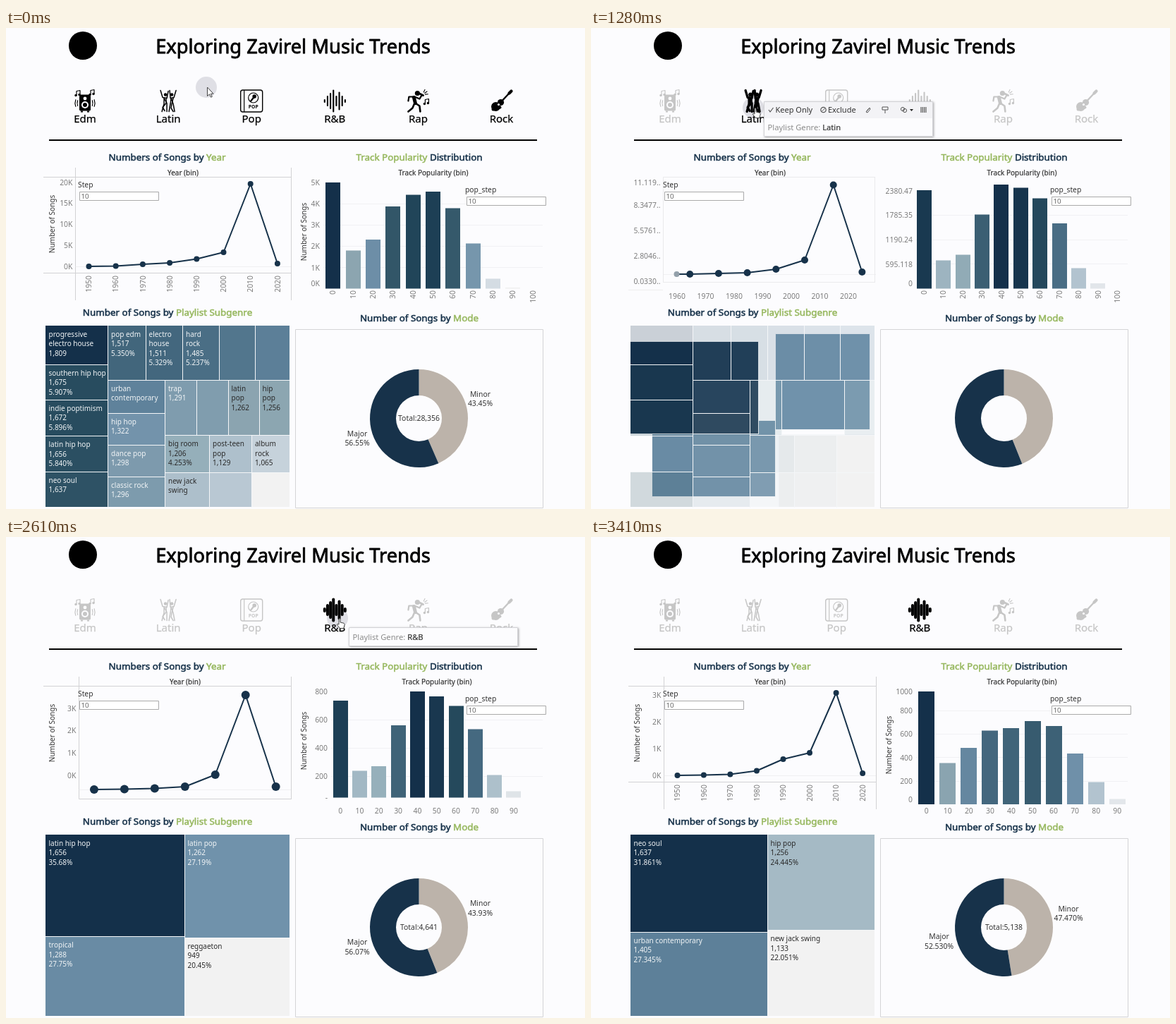
Recreate the animation shown at these times as an HTML page with a canvas. Size 821 px wide and 682 px high, loop 3.46 s.

```html
<!DOCTYPE html>
<html lang="en">
<head>
<meta charset="utf-8">
<title>Music Trends Dashboard</title>
<style>
  html, body { margin: 0; width: 100%; height: 100%; overflow: hidden; background: #fcfcfe; }
  canvas { display: block; }
</style>
</head>
<body>
<canvas id="stage" width="821" height="682"></canvas>
<script>
const ctx = document.getElementById('stage').getContext('2d');
const LOOP = 3460;
const BG = '#fcfcfe', NAVY = '#17324a', GREEN = '#97b85f', INK = '#333', GREY = '#7c7c7c', RULE = '#d2d2d4';
const TAU = Math.PI * 2;

// ---------- helpers ----------
const mix = (a, b, p) => Array.isArray(a) ? a.map((v, i) => mix(v, b[i], p)) : a + (b - a) * p;
const hold = (keys, t) => keys.filter(k => k[0] <= t).pop();
const clamp = (v, lo, hi) => Math.min(hi, Math.max(lo, v));
const crisp = v => Math.floor(v) + 0.5;
const font = (size, weight = 400) => `${weight} ${size}px "Noto Sans", "Open Sans", sans-serif`;

// heavy: outline width that thickens regular text to a medium weight
function text(s, x, y, { size = 10, color = INK, align = 'left', weight = 400, heavy = 0, rot = 0 } = {}) {
  ctx.save();
  ctx.translate(x, y);
  ctx.rotate(rot);
  ctx.font = font(size, weight);
  ctx.textAlign = align;
  ctx.fillStyle = ctx.strokeStyle = color;
  ctx.fillText(s, 0, size * 0.36);
  if (heavy) {
    ctx.lineWidth = heavy;
    ctx.lineJoin = 'round';
    ctx.strokeText(s, 0, size * 0.36);
  }
  const width = ctx.measureText(s).width;
  ctx.restore();
  return width;
}

function line(x1, y1, x2, y2, color = RULE, width = 1, dash = []) {
  ctx.strokeStyle = color;
  ctx.lineWidth = width;
  ctx.setLineDash(dash);
  ctx.beginPath();
  ctx.moveTo(x1, y1);
  ctx.lineTo(x2, y2);
  ctx.stroke();
  ctx.setLineDash([]);
}

function box(x, y, w, h, fill, stroke) {
  if (fill) { ctx.fillStyle = fill; ctx.fillRect(x, y, w, h); }
  if (stroke) { ctx.strokeStyle = stroke; ctx.lineWidth = 1; ctx.strokeRect(x + 0.5, y + 0.5, w - 1, h - 1); }
}

function dot(x, y, r, color) {
  if (color) ctx.fillStyle = color;
  ctx.beginPath();
  ctx.arc(x, y, r, 0, TAU);
  ctx.fill();
}

function poly(points, width) {
  ctx.lineWidth = width;
  ctx.beginPath();
  for (let i = 0; i < points.length; i += 2) ctx.lineTo(points[i], points[i + 1]);
  ctx.stroke();
}

// Shared light-to-navy scale for bars and tiles
const RAMP = [[0, 0xf2f2f2], [.1, 0xd2dae2], [.2, 0xb1c2ce], [.3, 0x95afba], [.36, 0x8ca5b0], [.44, 0x7192ab],
  [.54, 0x5d8099], [.66, 0x42667c], [.77, 0x335769], [.88, 0x22465a], [.93, 0x1b3b52], [1, 0x14304a]];
function shade(v) {
  const i = clamp(RAMP.findIndex(s => s[0] >= v), 1, RAMP.length - 1);
  const [[a, from], [b, to]] = [RAMP[i - 1], RAMP[i]];
  const p = clamp((v - a) / (b - a), 0, 1);
  const channel = n => Math.round(mix(from >> n & 255, to >> n & 255, p));
  return `rgb(${channel(16)},${channel(8)},${channel(0)})`;
}

// ---------- genre icons, centred on the origin ----------
function note(x, y) {
  dot(x, y + 4, 1.7);
  dot(x + 5, y + 3, 1.7);
  poly([x + 1, y + 4, x + 1, y - 2, x + 6, y - 3, x + 6, y + 3], 1.2);
}

const ICONS = {
  Edm() {
    ctx.beginPath();
    ctx.roundRect(-8, -9, 16, 23, 2);
    ctx.fill();
    ctx.fillRect(-6, 14, 3, 2);
    ctx.fillRect(3, 14, 3, 2);
    const color = ctx.fillStyle;
    dot(0, -3.5, 2.4, BG);
    dot(0, 5.5, 5, BG);
    dot(0, 5.5, 3, color);
    ctx.lineWidth = 1.2;
    for (const side of [0, Math.PI]) for (const r of [11, 14]) {
      ctx.beginPath();
      ctx.arc(0, 3, r, side - .35, side + .35);
      ctx.stroke();
    }
    note(-13, -12);
    note(7, -13);
  },
  Latin(bold) {
    const w = 1.5 * bold;
    dot(-4, -9, 1.8 + bold * .5);
    dot(5, -9, 1.8 + bold * .5);
    poly([-11, -15, -8, -5, -2, -4, 0, -14], w);
    poly([2, -15, 3, -4, 8, -5, 11, -15], w);
    poly([-9, 15, -6, 4, -6, -4, -2, 3, -2, 15], w);
    poly([1, 15, 3, 4, 4, -4, 7, 4, 9, 15], w);
    poly([-3, -3, -3, 3, -8, 9, -5, 14], w);
    poly([7, -4, 5, 4, 4, 10, 7, 15], w);
  },
  Pop() {
    ctx.lineWidth = 1.4;
    ctx.beginPath();
    ctx.roundRect(-15.5, -15.5, 31, 31, 3);
    ctx.stroke();
    poly([-10.5, -15, -10.5, 15], 1.2);
    ctx.beginPath();
    ctx.arc(2.5, -4.5, 7, 0, TAU);
    ctx.stroke();
    dot(4, -6.5, 2.8);
    poly([3, -5, -1, 0], 2.2);
    text('POP', 2.5, 8, { size: 6.8, weight: 700, align: 'center', color: ctx.fillStyle });
  },
  'R&B'(bold) {
    [3, 13, 21, 30, 13, 24, 13, 3].forEach((h, i) => {
      const x = -14.5 + i * 4.15;
      poly([x, -h / 2, x, h / 2], 2.1 * Math.min(bold, 1.9));
    });
  },
  Rap() {
    dot(-1, -11, 3.6);
    poly([-6, -5, -4, 3], 5);
    poly([-5, -6, 2, -3, 5, -8], 2.4);
    poly([-6, -6, -13, -6, -14, 0], 2.2);
    poly([-4, 3, 2, 7, 3, 15], 2.6);
    poly([-5, 3, -8, 10, -14, 15], 2.6);
    poly([3, -10, 7, -8], 3);
    for (const a of [-1.1, -.6, -.1]) {
      poly([6 + 4 * Math.cos(a), -9 + 4 * Math.sin(a), 6 + 8 * Math.cos(a), -9 + 8 * Math.sin(a)], 1.1);
    }
    note(9, 0);
  },
  Rock() {
    dot(-8, 8, 6.5);
    dot(-1, 2, 4.6);
    poly([-12, 12, -2, 9], 4);
    poly([-4, 5, 11, -11], 2.4);
    poly([11, -11, 14, -14], 4.2);
    poly([-10, 6, -6, 10], 1);
    dot(-4, 5, 1.6, BG);
  }
};

function drawGenres(selected, hovered) {
  Object.keys(ICONS).forEach((name, i) => {
    const x = 112 + i * 118.1;
    const active = !selected || name === selected;
    const bold = name === selected ? 2.2 : name === hovered ? 1.7 : 1;
    ctx.save();
    ctx.translate(x, 103.5);
    ctx.lineCap = ctx.lineJoin = 'round';
    ctx.fillStyle = ctx.strokeStyle = active || name === hovered ? '#000' : '#c6c6c6';
    ICONS[name](bold);
    ctx.restore();
    text(name, x, 128.5, { size: 15, align: 'center', heavy: .25, color: active ? '#000' : '#c6c6c6' });
  });
}

// ---------- static parts ----------
function heading(parts, cx, y) {
  const size = 13.4;
  ctx.font = font(size);
  let x = cx - ctx.measureText(parts.map(p => p[0]).join('')).width / 2;
  for (const [s, color] of parts) x += text(s, x, y, { size, heavy: .55, color });
}

function stepInput(label, x, y) {
  text(label, x, y, { size: 10.3 });
  box(x + 2, y + 10, 113, 13, '#fff', '#aaa');
  text('10', x + 4.5, y + 16.5, { color: '#666', size: 9.8 });
}

function drawHeader() {
  box(0, 0, 821, 682, BG);
  dot(109, 25, 20, '#000');
  text('Exploring Zavirel Music Trends', 407, 26.5, { size: 27.3, heavy: .8, align: 'center', color: '#000' });
  box(61, 158, 692, 2, '#000');
  heading([['Numbers of Songs by ', NAVY], ['Year', GREEN]], 228.5, 183);
  heading([['Track Popularity', GREEN], [' Distribution', NAVY]], 586, 183);
  heading([['Number of Songs by ', NAVY], ['Playlist Subgenre', GREEN]], 229, 403.5);
  heading([['Number of Songs by ', NAVY], ['Mode', GREEN]], 586, 411.5);
}

// ---------- line chart ----------
const YEAR_ALL = { left: 98.5, title: 251, x0: 117.5, dx: 38.2, r: 4, first: 0, base: 347.5, songsY: 278, zero: 338.5,
  ys: [338, 337.5, 335, 333, 327.5, 318, 221, 334], ticks: ['20K', '15K', '10K', '5K', '0K'], tickY: [219, 338] };
const YEAR_MID = { left: 102.5, title: 254, x0: 99.5, dx: 40.7, r: 5, first: 0, flat: true, bare: true, zero: 349.5,
  ys: [349, 349, 348, 347, 342, 329, 222.5, 346], tickY: [215, 359],
  ticks: ['11.119..', '8.3477..', '5.5761..', '2.8046..', '0.0330..'] };
const YEAR_LATIN = { left: 103.5, title: 254, x0: 82, dx: 42.95, r: 6, first: 1, base: 371.5, songsY: 290, flat: true, zero: 358.5,
  ys: [358, 358, 357.5, 356.5, 354, 337, 224, 354], ticks: ['3K', '2K', '1K', '0K'], tickY: [247, 358] };
const YEAR_RNB = { left: 103.5, title: 254, x0: 122.3, dx: 37.55, r: 4, first: 0, base: 347.5, songsY: 278, zero: 338.5,
  ys: [338, 337.5, 336.5, 331.5, 315, 306, 221, 335], ticks: ['3K', '2K', '1K', '0K'], tickY: [224, 338] };

function drawYear(c) {
  text('Year (bin)', c.title, 205, { align: 'center', heavy: .2 });
  if (c.bare) {
    ctx.setLineDash([1, 1]);
    box(102, 211, 301, 150, null, '#d8d8da');
    ctx.setLineDash([]);
    line(53, 371.5, 102, 371.5, '#eee');
  } else {
    const bottom = c.noLabels ? c.base : 386;
    line(53, 211.5, 405, 211.5);
    line(c.left, 198, c.left, bottom);
    line(404.5, 198, 404.5, bottom);
    line(c.noLabels ? c.left : 53, c.base, 405, c.base);
    text('Number of Songs', 65, c.songsY, { rot: -Math.PI / 2, align: 'center' });
  }
  line(c.left, c.zero, 404, c.zero, '#e4e4e6', 1, [1, 1]);
  c.ticks.forEach((s, i) => {
    const y = mix(...c.tickY, i / (c.ticks.length - 1));
    text(s, c.left - 4, Math.max(219, y), { size: 10.4, color: GREY, align: 'right' });
  });
  const xs = c.ys.map((_, i) => Math.max(c.left + 19, c.x0 + c.dx * i));
  ctx.strokeStyle = NAVY;
  ctx.lineJoin = 'round';
  poly(c.ys.flatMap((y, i) => i < c.first ? [] : [xs[i], y]), 2);
  c.ys.forEach((y, i) => {
    if (i < c.first) return;
    const fading = c.bare && i === 0;
    dot(xs[i], y, fading ? 4 : c.r, fading ? '#93a0aa' : NAVY);
  });
  if (!c.noLabels) xs.forEach((x, i) => {
    if (c.bare) { x = 122 + (i - 1) * 40.5; if (!i) return; }
    if (i < c.first) return;
    const style = { size: 10.4, color: GREY };
    if (c.flat) text(1950 + i * 10, x, 380, { ...style, align: 'center' });
    else text(1950 + i * 10, x, 351, { ...style, align: 'right', rot: -Math.PI / 2 });
  });
  stepInput('Step', 102, 222);
}

// ---------- bar chart ----------
const BARS_ALL = { x0: 463.7, dx: 28.33, w: 21, base: 369.5, right: 445, title: 606, songsY: 289,
  tops: [219, 315.5, 300, 253, 236.5, 232, 255.5, 305.5, 355.5, 368],
  ticks: ['5K', '4K', '3K', '2K', '1K', '0K'], tickY: [219, 30.2] };
const BARS_MID = { x0: 472.3, dx: 27.4, w: 21, base: 369.5, right: 456, title: 611,
  tops: [230, 329.5, 321.5, 264.5, 222, 226.5, 241.5, 277, 340.5, 362],
  ticks: ['2380.47', '1785.35', '1190.24', '595.118', '0'], tickY: [231, 34.6] };
const BARS_LATIN = { x0: 474.2, dx: 27.3, w: 21, base: 369.5, right: 456, title: 611, songsY: 289,
  tops: [232, 331.5, 325, 267, 219, 226, 239.5, 272.5, 337.5, 360.5],
  ticks: ['800', '600', '400', '200', '0'], tickY: [219, 37.5] };
const BARS_RNB = { x0: 475.7, dx: 30.06, w: 23, base: 379, right: 456, title: 611, songsY: 295, flat: true,
  tops: [219, 320.5, 299, 274.5, 271, 261, 268, 307, 347.5, 371.5],
  ticks: ['1000', '800', '600', '400', '200', '0'], tickY: [213, 33.3] };

function drawBars(c) {
  text('Track Popularity (bin)', c.title, 205, { align: 'center', heavy: .2 });
  if (c.songsY) text('Number of Songs', 422, c.songsY, { rot: -Math.PI / 2, align: 'center' });
  c.ticks.forEach((s, i) => {
    const y = c.tickY[0] + c.tickY[1] * i;
    if (i && i < c.ticks.length - 1) line(c.right + 5, crisp(y), 761, crisp(y), '#f1f1f4');
    text(s, c.right, clamp(y, 219, c.base - (s === '-' ? 0 : 7)), { size: 10.4, color: GREY, align: 'right' });
  });
  const peak = c.base - Math.min(...c.tops);
  c.tops.forEach((top, i) => {
    const x = Math.round(c.x0 + c.dx * i - c.w / 2);
    box(x, top, Math.round(c.w), c.base - top, shade((c.base - top) / peak));
  });
  for (let i = 0; i < (c.flat ? 10 : 11); i++) {
    const x = c.x0 + c.dx * i, style = { size: 10.4, color: GREY };
    if (c.flat) text(i * 10, x, 388, { ...style, align: 'center' });
    else text(i * 10, x, 372, { ...style, align: 'right', rot: -Math.PI / 2 });
  }
  stepInput('pop_step', 651, 229);
}

// ---------- treemap ----------
function tiles(xs, ys, cells) {
  const cols = xs.length - 1;
  return cells.map(([value, label], i) => {
    const c = i % cols, r = Math.floor(i / cols);
    return { rect: [xs[c], ys[r], xs[c + 1], ys[r + 1]], value, label };
  });
}
const TREE_ALL = [
  ...tiles([56, 144.5], [422, 477, 527, 578.5, 629, 679], [
    [1809, 'progressive|electro house|1,809'], [1675, 'southern hip hop|1,675|5.907%'],
    [1672, 'indie poptimism|1,672|5.896%'], [1656, 'latin hip hop|1,656|5.840%'], [1637, 'neo soul|1,637']]),
  ...tiles([144.5, 198, 250.5, 302.5, 353, 402], [422, 499], [
    [1517, 'pop edm|1,517|5.350%'], [1511, 'electro|house|1,511|5.329%'], [1485, 'hard|rock|1,485|5.237%'], [1455], [1416]]),
  ...tiles([144.5, 225.5], [499, 546, 591, 636, 679], [
    [1405, 'urban|contemporary'], [1322, 'hip hop|1,322'], [1298, 'dance pop|1,298'], [1296, 'classic rock|1,296']]),
  ...tiles([225.5, 270.5, 315, 359, 402], [499, 577.5], [
    [1291, 'trap|1,291'], [1288], [1262, 'latin|pop|1,262'], [1256, 'hip|pop|1,256']]),
  ...tiles([225.5, 288.5, 348.5, 402], [577.5, 630, 679], [
    [1206, 'big room|1,206|4.253%'], [1129, 'post-teen|pop|1,129'], [1065, 'album|rock|1,065'],
    [1133, 'new jack|swing'], [1100], [949]])
];
const quad = (x, left, right, cells) => [
  ...tiles([56, x], [422, left, 679], cells.slice(0, 2)),
  ...tiles([x, 402], [422, right, 679], cells.slice(2))];
const TREE_LATIN = quad(253, 566.5, 568, [
  [1656, 'latin hip hop|1,656|35.68%'], [1288, 'tropical|1,288|27.75%'],
  [1262, 'latin pop|1,262|27.19%'], [949, 'reggaeton|949|20.45%']]);
const TREE_RNB = quad(250, 560, 557.5, [
  [1637, 'neo soul|1,637|31.861%'], [1405, 'urban contemporary|1,405|27.345%'],
  [1256, 'hip pop|1,256|24.445%'], [1133, 'new jack swing|1,133|22.051%']]);
const LATIN_FROM = [3, 15, 16, 23];

function drawTiles(list, labels = true, alpha = 1) {
  const values = list.map(t => t.value);
  const low = Math.min(...values), span = Math.max(...values) - low;
  for (const { rect, value, label } of list) {
    const v = (value - low) / span;
    const [x1, y1, x2, y2] = rect.map(Math.floor);
    ctx.globalAlpha = alpha;
    box(x1, y1, x2 - x1, y2 - y1, shade(v));
    ctx.globalAlpha = 1;
    // light gaps on inner edges only
    if (x2 < 402) box(x2, y1, 1, y2 - y1 + 1, '#f4f6f8');
    if (y2 < 679) box(x1, y2, x2 - x1, 1, '#f4f6f8');
    if (x1 > 56) box(x1, y1, 1, y2 - y1, '#f4f6f8');
    if (y1 > 422) box(x1, y1, x2 - x1, 1, '#f4f6f8');
    if (labels && label) label.split('|').forEach((s, i) =>
      text(s, rect[0] + 4.5, rect[1] + 12 + i * 13.5, { color: v > .38 ? '#f1f4f6' : '#2b2b2b' }));
  }
}

function drawLatinZoom(p) {
  const moving = TREE_LATIN.map((t, i) => ({ ...t, rect: mix(TREE_ALL[LATIN_FROM[i]].rect, t.rect, p) }));
  drawTiles([3, 1, 2, 0].map(i => moving[i]), false);
  drawTiles(TREE_ALL.filter((_, i) => !LATIN_FROM.includes(i)), false, (1 - p) * 1.5);
}

function drawRnbFade(p) {
  drawTiles(TREE_LATIN, false);
  drawTiles(TREE_RNB, false, p);
}

// ---------- donut ----------
const MODE_ALL = { minor: .4345, total: '28,356', pct: ['43.45%', '56.55%'], at: [672.5, 519, 498, 575] };
const MODE_LATIN = { minor: .4393, total: '4,641', pct: ['43.93%', '56.07%'], at: [672.5, 519.5, 498, 574.5] };
const MODE_RNB = { minor: .4747, total: '5,138', pct: ['47.470%', '52.530%'], at: [677, 527, 493.5, 566.5] };

function drawMode(c, labels) {
  box(410, 427, 352, 254, null, '#d4d4d6');
  const cx = 585.5, cy = 553.5, top = -Math.PI / 2, split = top + TAU * c.minor;
  for (const [from, to, color] of [[top, split, '#bcb3aa'], [split, top + TAU, NAVY]]) {
    ctx.fillStyle = color;
    ctx.beginPath();
    ctx.arc(cx, cy, 69.5, from, to);
    ctx.arc(cx, cy, 32.5, to, from, true);
    ctx.fill();
  }
  if (!labels) return;
  const style = { align: 'center', size: 10.4 };
  text('Total:' + c.total, cx, 553.5, style);
  ['Minor', 'Major'].forEach((name, i) => {
    text(name, c.at[i * 2], c.at[i * 2 + 1], style);
    text(c.pct[i], c.at[i * 2], c.at[i * 2 + 1] + 13.5, style);
  });
}

// ---------- tooltip and pointer ----------
function drawTip({ x, y, genre, wide, menu }) {
  const w = wide ? 240 : 122, top = menu ? y - 23 : y, h = y + 27 - top;
  ctx.save();
  ctx.shadowColor = 'rgba(0,0,0,.35)';
  ctx.shadowBlur = 3;
  ctx.shadowOffsetX = ctx.shadowOffsetY = 1;
  box(x, top, w, h, BG);
  ctx.restore();
  if (menu) box(x, top, w, 24, '#f3f3f6');
  box(x, top, w, h, null, '#d3d3d7');
  const offset = text('Playlist Genre: ', x + 5.5, y + 14, { size: 11.2, color: '#8b8b8b' });
  text(genre, x + 5.5 + offset, y + 14, { size: 11.2, heavy: .2 });
  if (!menu) return;
  const my = y - 11;
  ctx.save();
  ctx.translate(x, my);
  ctx.strokeStyle = ctx.fillStyle = '#555';
  poly([7, 0, 9, 3, 13.5, -3], 1.2);
  const ring = (cx, cy, r) => { ctx.beginPath(); ctx.arc(cx, cy, r, 0, TAU); ctx.stroke(); };
  ring(84.5, 0, 3.7);
  poly([82, 2.5, 87, -2.5], 1);
  poly([146, 2, 150, -3, 151, -1, 147, 4, 145, 3, 149, -2], 1);
  ctx.strokeRect(168, -4, 8, 4);
  poly([172, 0, 172, 5], 1);
  ring(197, -1, 2.6);
  ring(200, 1, 2.6);
  for (let i = 0; i < 4; i++) poly([223 + i * 2.3, -4, 223 + i * 2.3, 4], 1.2);
  ctx.fillStyle = '#222';
  ctx.beginPath();
  ctx.moveTo(207, -1);
  ctx.lineTo(212, -1);
  ctx.lineTo(209.5, 2);
  ctx.fill();
  ctx.restore();
  text('Keep Only', x + 16.5, my, { size: 11 });
  text('Exclude', x + 91, my, { size: 11 });
}

const ARROW = 'M0 0V12.5L3 9.8 5 14.2 6.8 13.4 4.9 9.2H8.6Z';
const HAND = 'M3 1Q4.2 0 5 1.2V6L10 7.2Q11.5 8 11 10L9.8 14.5H4.6L.2 9.2Q.3 7.5 3 9Z';
function drawPointer([, x, y, hand]) {
  ctx.save();
  ctx.globalCompositeOperation = 'multiply';
  dot(x, y, 15, '#e2e2e6');
  ctx.restore();
  ctx.save();
  ctx.translate(hand ? x - 1 : x + 1.5, y);
  const shape = new Path2D(hand ? HAND : ARROW);
  ctx.fillStyle = '#fff';
  ctx.strokeStyle = '#444';
  ctx.lineWidth = 1;
  ctx.fill(shape);
  ctx.stroke(shape);
  ctx.restore();
}

// ---------- timeline ----------
const POINTER = [[0, 284, 84], [320, 280, 86], [380, 271, 93], [440, 260, 103], [500, 250, 113, 1], [560, 242, 115, 1],
  [630, 235, 114, 1], [690, 230, 113, 1], [1550, 250, 99], [1600, 340, 78], [1660, 430, 75], [1710, 470, 78],
  [1760, 473, 90, 1], [1810, 472, 106, 1], [1870, 470, 115, 1], [3250, 510, 170], [3300, 660, 300], [3360, 803, 460], [3410]];

const yearBlend = (a, b, p) => ({ ...b, x0: mix(a.x0, b.x0, p), dx: mix(a.dx, b.dx, p), ys: mix(a.ys, b.ys, p) });
const barBlend = (a, b, p) => ({ ...b, x0: mix(a.x0, b.x0, p), dx: mix(a.dx, b.dx, p), w: mix(a.w, b.w, p),
  tops: a.tops.map((y, i) => b.base - mix(a.base - y, b.base - b.tops[i], p)) });

const all = [YEAR_ALL, BARS_ALL, () => drawTiles(TREE_ALL), MODE_ALL, true];
const latin = [YEAR_LATIN, BARS_LATIN, () => drawTiles(TREE_LATIN), MODE_LATIN, true];
const rnbTiles = () => drawTiles(TREE_RNB);
const toRnb = p => [yearBlend(YEAR_LATIN, YEAR_RNB, p), barBlend(BARS_LATIN, BARS_RNB, p), () => drawRnbFade(p),
  { minor: mix(MODE_LATIN.minor, MODE_RNB.minor, p) }, false];
const SCENES = [
  [0, all],
  [1220, [yearBlend(YEAR_ALL, YEAR_MID, .5), barBlend(BARS_ALL, BARS_MID, .5), () => drawLatinZoom(.5), MODE_ALL, false]],
  [1280, [YEAR_MID, BARS_MID, () => drawLatinZoom(.857), MODE_LATIN, false]],
  [1390, latin],
  [2610, [{ ...YEAR_LATIN, tickY: [243, 338], songsY: 278, noLabels: true },
    { ...BARS_LATIN, ticks: ['800', '600', '400', '200', '-'], tickY: [219, 40], flat: true }, ...latin.slice(2)]],
  [2670, toRnb(.45)],
  [2770, toRnb(.857)],
  [2830, [YEAR_RNB, BARS_RNB, rnbTiles, MODE_RNB, false]],
  [2880, [YEAR_RNB, BARS_RNB, rnbTiles, MODE_RNB, true]]
];

function tipAt(t, pointer) {
  if (t >= 500 && t < 1550) return { x: pointer[1] + 15, y: pointer[2] + 14, genre: 'Latin', wide: t >= 1170, menu: t >= 1220 };
  if (t >= 1810 && t < 3250) return { x: 486, y: 128, genre: 'R&B', wide: t >= 2610, menu: t >= 2670 };
}

function draw(t) {
  const pointer = hold(POINTER, t);
  const [year, bars, tree, mode, modeLabels] = hold(SCENES, t)[1];
  const selected = t < 1170 ? null : t < 2610 ? 'Latin' : 'R&B';
  const hovered = t >= 500 && t < 1550 ? 'Latin' : t >= 2130 && t < 3250 ? 'R&B' : null;
  drawHeader();
  drawGenres(selected, hovered);
  drawYear(year);
  drawBars(bars);
  tree();
  drawMode(mode, modeLabels);
  const tip = tipAt(t, pointer);
  if (tip) drawTip(tip);
  if (pointer.length > 1) drawPointer(pointer);
}

const start = performance.now();
function tick() {
  draw((performance.now() - start) % LOOP);
  requestAnimationFrame(tick);
}
tick();
</script>
</body>
</html>
```
